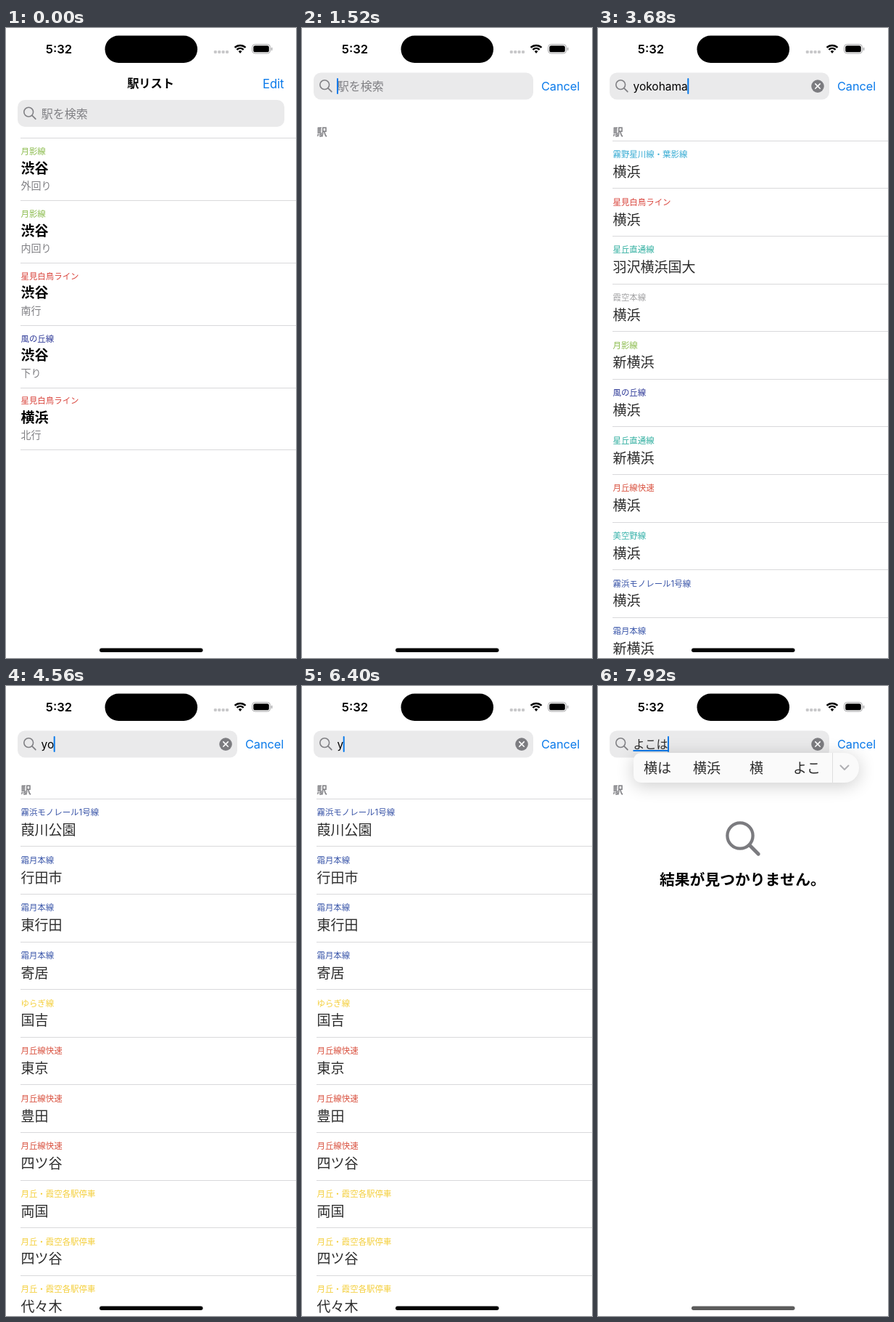
An HTML page with a canvas that plays this animation: 400x867 px, repeating every 8 s.

```html
<!DOCTYPE html>
<html lang="ja">
<head>
<meta charset="utf-8">
<title>駅リスト</title>
<style>
html, body { margin: 0; width: 100%; height: 100%; overflow: hidden; background: #fff; }
canvas { display: block; width: 400px; height: 867px; }
</style>
</head>
<body>
<canvas id="stage"></canvas>
<script>
const W = 400, H = 867, LOOP = 8000, SEARCH_LAG = 120;
const BLUE = '#0a7aea', GRAY = '#818185', RULE = '#d9d9db', INK = '#2c2c2c';
const FONT = 'Inter, "Noto Sans CJK JP", "Noto Sans CJK", sans-serif';

const canvas = document.getElementById('stage');
const ctx = canvas.getContext('2d');
const dpr = window.devicePixelRatio || 1;
canvas.width = W * dpr;
canvas.height = H * dpr;

const LINES = {
  G: ['月影線', '#8cbc4e'],
  R: ['星見白鳥ライン', '#d9433b'],
  N: ['風の丘線', '#2f3a98'],
  A: ['雲丘線', '#a0a0a2'],
  B: ['霧野星川線・葉影線', '#36abd3'],
  K: ['美空野線', '#36b2aa'],
  S: ['霞空本線', '#a0a0a2'],
  D: ['星丘直通線', '#2fae9f'],
  M: ['霧浜モノレール1号線', '#3a55a8'],
  C: ['霜月本線', '#3b57aa'],
  I: ['ゆらぎ線', '#f4cf3c'],
  O: ['月丘線快速', '#d9513f'],
  Y: ['月丘・霞空各駅停車', '#f4cf3c']
};

const parse = rows => rows.split(' ').map(r => [LINES[r[0]], r.slice(1)]);

const favorites = [['G', '渋谷', '外回り'], ['G', '渋谷', '内回り'], ['R', '渋谷', '南行'],
  ['N', '渋谷', '下り'], ['R', '横浜', '北行']];

const yoko = parse('A明覚 B洋光台 B横浜 K東清川 K東横田 K上総清川 K横田 R横浜 S八日市場 S横芝 D羽沢横浜国大');
const yokohama = parse('B横浜 R横浜 D羽沢横浜国大 S横浜 G新横浜 N横浜 D新横浜 O横浜 K横浜 M横浜 C新横浜');
const results = {
  y: parse('M市役所前 M葭川公園 Cふかや花園 C行田市 C羽生 C東行田 Cひろせ野鳥の森 C上熊谷 C熊谷 C西羽生 C親鼻'),
  yo: parse('M葭川公園 C行田市 C東行田 C寄居 I国吉 O東京 O豊田 O四ツ谷 Y両国 Y四ツ谷 Y代々木'),
  yok: yoko, yoko,
  yokoh: yokohama, yokoha: yokohama, yokoham: yokohama, yokohama,
  'よ': parse('C寄居 I国吉 O豊田 O四ツ谷 Y四ツ谷 Y代々木 A用土 A寄居 B洋光台 B横浜 B与野'),
  'よこ': yoko
};

const typing = [[0, ''],
  [1880, 'y'], [2120, 'yo'], [2360, 'yok'], [2500, 'yoko'],
  [2760, 'yokoh'], [2960, 'yokoha'], [3160, 'yokoham'], [3360, 'yokohama'],
  [4000, 'yokoham'], [4080, 'yokoha'], [4160, 'yokoh'], [4240, 'yoko'], [4320, 'yok'],
  [4420, 'yo'], [4600, 'y'], [4680, ''],
  [5400, 'y'], [5800, 'yo'], [6380, 'y'], [6460, ''],
  [6720, 'よ'], [6960, 'よk'], [7280, 'よこ'], [7600, 'よこh'], [7880, 'よこは']];

// Input-method suggestions: [label, x]
const suggestions = {
  'よ': [['よ', 63], ['世', 114], ['夜', 169], ['余', 229], ['ヨ', 284]],
  'よk': [['よk', 59], ['横', 114], ['よく', 160], ['良く', 220], ['ヨk', 280]],
  'よこ': [['横', 72], ['よこ', 131], ['横浜', 200], ['ヨコ', 269]],
  'よこh': [['横h', 63], ['よこh', 125], ['横', 209], ['ヨコh', 260]],
  'よこは': [['横は', 63], ['横浜', 131], ['横', 209], ['よこ', 269]]
};

const queryAt = t => typing.filter(([start]) => start <= t).pop()[1];
const clamp = v => Math.max(0, Math.min(1, v));
const ease = v => v * v * (3 - 2 * v);
const mix = (a, b, p) => a + (b - a) * p;

// Loosens a Latin letter that follows kana or kanji.
const spaced = str => str.replace(/([^\x00-\x7f])([kh])$/, '$1\u200a$2');

function text(str, x, midY, size, color, weight = 400, align = 'left') {
  ctx.font = `${weight} ${size}px ${FONT}`;
  ctx.textAlign = align;
  ctx.fillStyle = color;
  ctx.fillText(str, x, midY + size * 0.37);
  return ctx.measureText(str).width;
}

function box(x, y, w, h, r, color) {
  ctx.fillStyle = color;
  ctx.beginPath();
  ctx.roundRect(x, y, w, h, r);
  ctx.fill();
}

function stroke(color, width, points) {
  ctx.strokeStyle = color;
  ctx.lineWidth = width;
  ctx.lineCap = ctx.lineJoin = 'round';
  ctx.beginPath();
  points.forEach(([x, y]) => ctx.lineTo(x, y));
  ctx.stroke();
}

function ring(x, y, r, color, width, from = 0, to = Math.PI * 2) {
  ctx.strokeStyle = color;
  ctx.lineWidth = width;
  ctx.lineCap = 'butt';
  ctx.beginPath();
  ctx.arc(x, y, r, from, to);
  ctx.stroke();
}

const rule = y => box(20, Math.round(y), W - 20, 1, 0, RULE);

function faded(alpha, draw) {
  if (alpha <= 0) return;
  ctx.save();
  ctx.globalAlpha = alpha;
  draw();
  ctx.restore();
}

function statusBar() {
  text('5:32', 73, 29, 16.6, '#000', 600, 'center');
  box(136.5, 10.5, 127.5, 37.5, 18.75, '#000');
  for (let i = 0; i < 4; i++) box(286.8 + i * 5.4, 31, 4, 4, 1.2, '#c8c8ca');
  const up = -Math.PI / 2, spread = 0.78;
  ring(323, 34.5, 10.6, '#000', 2.5, up - spread, up + spread);
  ring(323, 34.5, 6.6, '#000', 2.4, up - spread, up + spread);
  ctx.fillStyle = '#000';
  ctx.beginPath();
  ctx.moveTo(323, 35);
  ctx.arc(323, 34.5, 3.4, up - spread, up + spread);
  ctx.fill();
  ctx.strokeStyle = '#a6a6a8';
  ctx.lineWidth = 1;
  ctx.beginPath();
  ctx.roundRect(339.5, 22.5, 25, 12.5, 4);
  ctx.stroke();
  box(341.2, 24.2, 21.6, 9.1, 2.6, '#000');
  box(365.8, 26.7, 1.5, 4.2, 1, '#a6a6a8');
}

function favoriteList(shift) {
  rule(151.3 + shift);
  favorites.forEach(([key, station, direction], i) => {
    const y = i * 85.8 + shift, [name, color] = LINES[key];
    text(name, 20.5, 170 + y, 11.45, color);
    text(station, 20.5, 192.7 + y, 19, '#000', 700);
    text(direction, 20.5, 217 + y, 14, GRAY);
    rule(237.1 + y);
  });
}

function searchField(p, query, caret) {
  const y = mix(99, 61.5, p), mid = y + 18.6;
  box(16, y, mix(368, 303, p), 37, 10, '#eaeaeb');
  ring(31.2, mid - 2, 6.4, GRAY, 1.6);
  stroke(GRAY, 1.8, [[36, mid + 2.8], [40.8, mid + 7.6]]);
  if (!query) text('駅を検索', 48.7, mid, 16, GRAY);
  let width = 0;
  if (query) {
    const composing = query in suggestions;
    width = text(spaced(query), 48.5, mid, composing ? 16 : 15.5, composing ? INK : '#000');
    if (composing) box(48.5, 88, width, 2, 0, BLUE);
    ctx.fillStyle = '#7c7c80';
    ctx.beginPath();
    ctx.arc(303, mid, 8.8, 0, Math.PI * 2);
    ctx.fill();
    for (const s of [1, -1]) stroke('#fff', 1.6, [[299.8, mid - 3.2 * s], [306.2, mid + 3.2 * s]]);
  }
  if (caret) box(48 + width, mid - 11, 2, 22, 1, BLUE);
}

function resultList(query) {
  if (!query) return;
  const rows = results[query];
  if (!rows) {
    ring(196, 206, 17.6, '#7b7b7f', 4.3);
    stroke('#7b7b7f', 5, [[209.5, 219.5], [221.2, 231.2]]);
    text('結果が見つかりません。', 85, 266, 20.8, '#000', 700);
    return;
  }
  rule(155);
  rows.forEach(([[name, color], station], i) => {
    const y = i * 65.6;
    text(name, 20.5, 174 + y, 11.45, color);
    text(station, 20.5, 198 + y, 19, INK);
    rule(220.3 + y);
  });
}

function suggestionBar(items) {
  ctx.save();
  ctx.shadowColor = 'rgba(0,0,0,.2)';
  ctx.shadowBlur = 24 * dpr;
  ctx.shadowOffsetY = 4 * dpr;
  box(49, 92, 311, 41, [10, 20, 20, 10], '#fafafa');
  ctx.restore();
  items.forEach(([label, x]) => text(spaced(label), x, 112.5, 19, INK));
  box(323, 92, 1, 41, 0, '#dededf');
  stroke('#b0b0b4', 2, [[334.5, 109.5], [340, 115], [345.5, 109.5]]);
}

function draw(t) {
  ctx.setTransform(dpr, 0, 0, dpr, 0, 0);
  ctx.fillStyle = '#fff';
  ctx.fillRect(0, 0, W, H);

  const open = ease(clamp((t - 840) / 480));
  const query = queryAt(t);

  faded(1 - open, () => {
    favoriteList(-37.5 * open);
    text('駅リスト', 199.5, 76.5 - 20 * open, 16.2, '#000', 700, 'center');
    text('Edit', 383.5, 76.5 - 20 * open, 16.6, BLUE, 400, 'right');
  });
  faded(open, () => {
    text('駅', 20.5, 142.5, 14.2, GRAY, 700);
    resultList(queryAt(t - SEARCH_LAG));
    text('Cancel', mix(440, 383.3, open), 79.7, 16.3, BLUE, 400, 'right');
  });
  searchField(open, query, t >= 1240);
  if (suggestions[query]) suggestionBar(suggestions[query]);
  statusBar();
  box(129, 853.5, 142.5, 5.5, 2.75, t >= 6720 ? '#5c5c5c' : '#000');
}

function tick() {
  draw(performance.now() % LOOP);
  requestAnimationFrame(tick);
}
tick();
</script>
</body>
</html>
```
